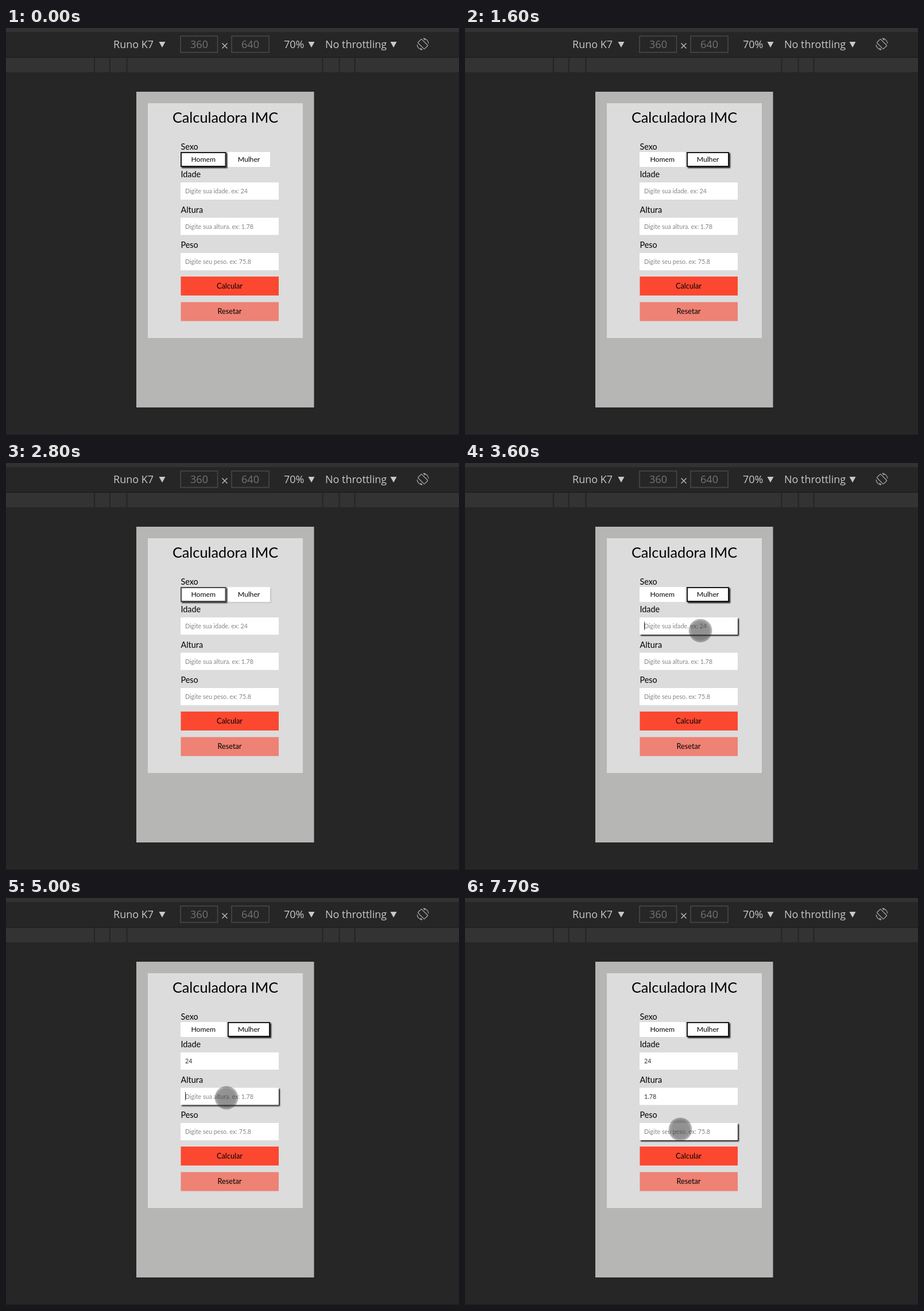
Animation, 789 px wide and 709 px high, one loop 8 s. Source, as an HTML page:

```html
<!DOCTYPE html>
<html lang="pt">
<head>
<meta charset="utf-8">
<style>
html, body { margin: 0; width: 100%; height: 100%; overflow: hidden; background: #262626; }
svg { display: block; }
.bar { font: 18px "Open Sans", "Noto Sans", sans-serif; fill: #c9c9c9; }
.bar .dim { fill: #747474; }
.form { font: 14.4px Lato, sans-serif; fill: #000; }
.form .title { font-size: 25.3px; }
.form .button { font-size: 12.7px; text-anchor: middle; }
.form .toggle { font-size: 12.2px; text-anchor: middle; }
.form .field { font-size: 10.7px; }
</style>
</head>
<body>
<svg width="789" height="709" viewBox="0 0 789 709">
  <defs>
    <radialGradient id="touch">
      <stop offset="0" stop-color="#303030" stop-opacity=".54"/>
      <stop offset=".76" stop-color="#303030" stop-opacity=".52"/>
      <stop offset=".9" stop-color="#303030" stop-opacity=".4"/>
      <stop offset="1" stop-color="#303030" stop-opacity=".3"/>
    </radialGradient>
  </defs>
  <rect width="789" height="709" fill="#262626"/>
  <path d="M0 0H789V7H0z" fill="#323232"/>
  <path d="M0 50H789V52H0z" fill="#202020"/>
  <path d="M0 52H789V77H0z" fill="#333"/>
  <path d="M154 52V77M181 52V77M210.500 52V77M551.500 52V77M580.500 52V77M607.500 52V77" stroke="#242424" stroke-width="2"/>
  <path d="M0 708H789V709H0z" fill="#1d1d1d"/>
  <g class="bar">
    <text x="187" y="35">Runo K7</text>
    <text class="dim" x="336.500" y="35" text-anchor="middle">360</text>
    <text class="dim" x="425.500" y="35" text-anchor="middle">640</text>
    <text x="484" y="35">70%</text>
    <text x="556" y="35">No throttling</text>
    <path d="M266.500 24h11l-5.500 10zM526.500 24h11l-5.500 10zM669.500 24h11l-5.500 10z"/>
  </g>
  <g fill="none" stroke="#4a4a4a" stroke-width="1.500">
    <rect x="304" y="14" width="64.500" height="28.500"/>
    <rect x="393" y="14" width="65" height="28.500"/>
    <path d="M376.500 26.500l9 9m0-9l-9 9" stroke="#b5b5b5"/>
  </g>
  <g fill="none" stroke="#a5a5a5" stroke-width="1.300" transform="translate(726 28)">
    <rect x="-4.500" y="-8" width="9" height="16" rx="1" transform="rotate(-45)"/>
    <path d="M1 -10A10 10 0 0 1 10 -1M-1 10A10 10 0 0 1 -10 1M1 -10l3 3M-1 10l-3 -3"/>
  </g>
  <rect x="227" y="111" width="309.500" height="550" fill="#b6b6b5"/>
  <rect x="247" y="131" width="270" height="409" fill="#dcdcdc"/>
  <g class="form" id="form">
    <text class="title" x="382" y="165" text-anchor="middle">Calculadora IMC</text>
    <text x="304.500" y="212">Sexo</text>
    <text x="304.500" y="260">Idade</text>
    <text x="304.500" y="322">Altura</text>
    <text x="304.500" y="383">Peso</text>
    <rect x="304.500" y="433" width="170.500" height="33" fill="#fc4830"/>
    <rect x="304.500" y="477.500" width="170.500" height="33" fill="#ee8274"/>
    <text class="button" x="389.500" y="454">Calcular</text>
    <text class="button" x="389.500" y="498">Resetar</text>
  </g>
  <path id="caret" stroke="#333" stroke-width="1"/>
  <circle id="pointer" r="20.500" fill="url(#touch)"/>
</svg>
<script>
const LOOP = 8000, FADE = 300;
const $ = id => document.getElementById(id);

function add(tag, attrs, text = '') {
  const el = document.createElementNS('http://www.w3.org/2000/svg', tag);
  for (const k in attrs) el.setAttribute(k, attrs[k]);
  el.textContent = text;
  return $('form').appendChild(el);
}

// Spans [from, to] during which each control is selected or focused.
const toggles = [
  { label: 'Homem', x: 304, w: 79.5, on: [[-999, 1300], [1750, 2250], [2600, 3000]] },
  { label: 'Mulher', x: 386, w: 74, on: [[1300, 1750], [2250, 2600], [3000, 9999]] }
];
const fields = [
  { y: 269, hint: 'Digite sua idade. ex: 24', on: [[3280, 4690]],
    keys: [[4100, '2'], [4300, '24']] },
  { y: 330.5, hint: 'Digite sua altura. ex: 1.78', on: [[4690, 7100]],
    keys: [[5800, '1'], [6000, '1.'], [6200, '1.7'], [6300, '1.78']] },
  { y: 392, hint: 'Digite seu peso. ex: 75.8', on: [[7100, 9999]], keys: [] }
];
// Touch marker: from, to, x, y.
const touches = [
  [600, 700, 410, 199], [900, 1300, 423, 233], [3200, 4000, 410, 292],
  [4600, 5800, 384, 348], [6600, 6700, 388, 350], [7000, 8000, 375, 403]
];

for (const b of toggles) {
  b.box = add('rect', { x: b.x, y: 216, width: b.w, height: 26, fill: '#fff' });
  b.edge = add('rect', { x: b.x + 1, y: 217, width: b.w - 2, height: 24,
    fill: 'none', stroke: '#1a1a1a', 'stroke-width': 2 });
  add('text', { class: 'toggle', x: b.x + b.w / 2, y: 233 }, b.label);
}
for (const f of fields) {
  f.box = add('rect', { x: 304, y: f.y, width: 171, height: 30, fill: '#fff' });
  f.text = add('text', { class: 'field', x: 312, y: f.y + 19 });
}

const ease = p => { p = Math.min(1, Math.max(0, p)); return p * (2 - p); };
const level = (spans, t) => spans.reduce((sum, [from, to]) =>
  sum + ease((t - from) / FADE) - ease((t - to) / FADE), 0);
const shade = (el, k) => {
  el.style.filter = k > 0.01 ? `drop-shadow(2px 2px 1.2px rgba(0,0,0,${k * 0.9}))` : 'none';
};

function draw(t) {
  for (const b of toggles) {
    const k = level(b.on, t);
    shade(b.box, k);
    b.edge.setAttribute('opacity', k * k);
  }
  let caret = '';
  for (const f of fields) {
    shade(f.box, level(f.on, t));
    const key = f.keys.filter(k => t >= k[0]).pop();
    f.text.textContent = key ? key[1] : f.hint;
    f.text.setAttribute('fill', key ? '#333' : '#858585');
    const [from, to] = f.on[0];
    const blink = (t - (key ? key[0] : from)) % 1000 < (key ? 400 : 520);
    if (t >= from && t < to && blink) {
      const x = 312.5 + (key ? f.text.getComputedTextLength() : 0);
      caret = `M${x} ${f.y + 7.5}v14.500`;
    }
  }
  $('caret').setAttribute('d', caret);
  const touch = touches.find(([from, to]) => t >= from && t < to);
  $('pointer').style.display = touch ? '' : 'none';
  if (touch) $('pointer').setAttribute('transform', `translate(${touch[2]} ${touch[3]})`);
}

const start = performance.now();
function tick() {
  draw((performance.now() - start) % LOOP);
  requestAnimationFrame(tick);
}
tick();
</script>
</body>
</html>
```
